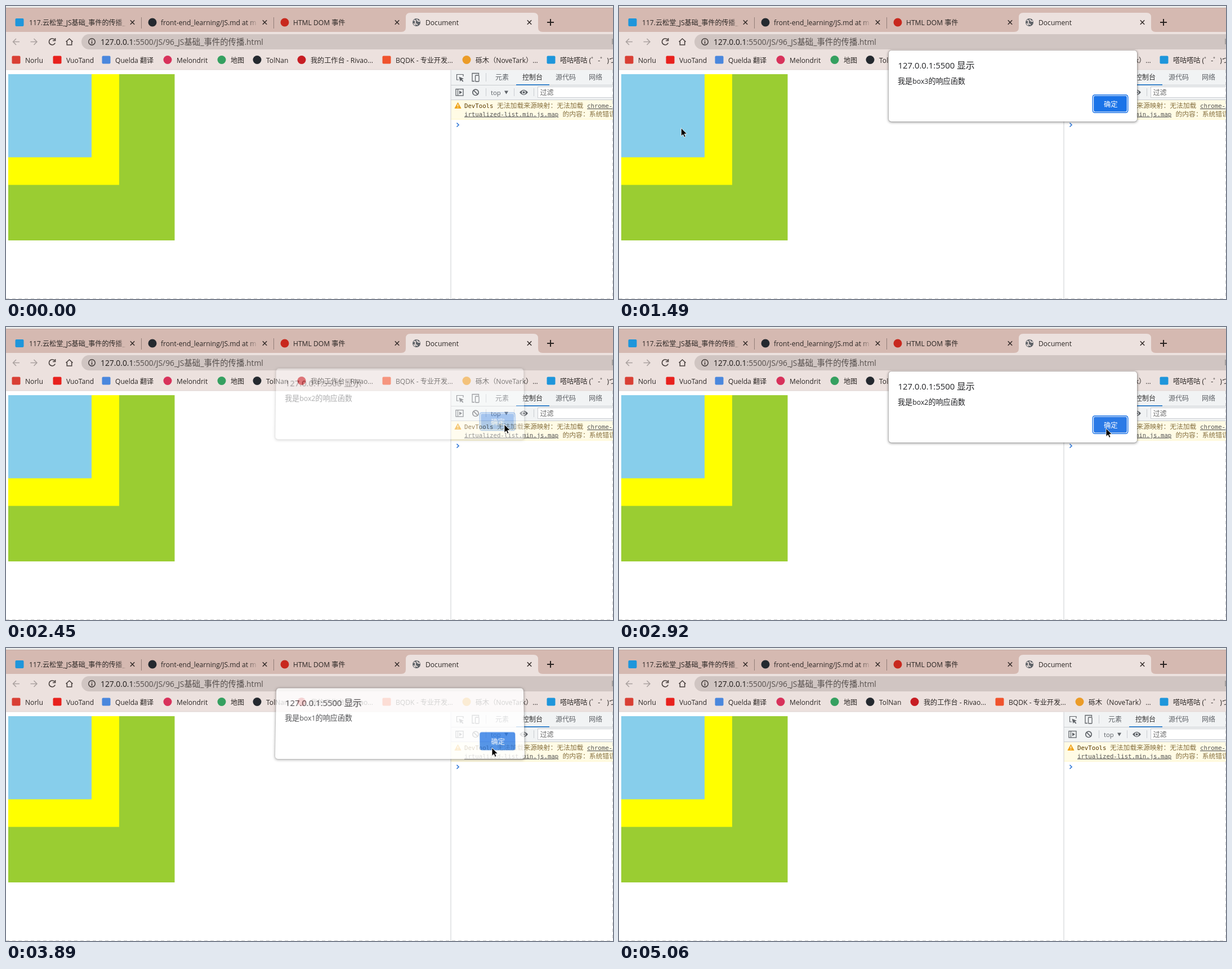
Write an HTML page that moves like this. It is 1078x520 px and loops after 5080 ms.

```html
<!DOCTYPE html>
<html lang="zh">
<head>
<meta charset="utf-8">
<style>
html, body { margin: 0; width: 100%; height: 100%; overflow: hidden; background: #fff; }
svg { position: absolute; left: 0; top: 0; overflow: visible; }
text { white-space: pre; font-family: 'Noto Sans CJK SC', 'Noto Sans CJK', sans-serif; }
#dialog {
  position: absolute; left: 479px; top: 79px; width: 441px; height: 126px;
  background: #fff; border-radius: 5px;
  box-shadow: 0 0 0 1px rgba(0,0,0,.1), 0 1px 4px 1px rgba(0,0,0,.35);
}
</style>
</head>
<body>
<svg id="page" width="1078" height="520"></svg>
<div id="dialog"><svg id="sheet" width="441" height="126"></svg></div>
<svg id="pointer" width="1078" height="520">
  <circle id="spot" r="12" fill="#ff0" fill-opacity=".5"/>
  <path id="arrow" d="M0 0V14.5L3.4 11.4 5.6 16.4 8 15.3 5.8 10.5H10.4Z" stroke="#fff" stroke-width=".9"/>
  <path id="beam" d="M-4.5-8H-1.5L0-7 1.5-8H4.5M0-7V7M-4.5 8H-1.5L0 7 1.5 8H4.5" fill="none" stroke="#333" stroke-width="1.4"/>
</svg>
<script>
const LOOP = 5080;
const $ = id => document.getElementById(id);
const UI = "'Open Sans', sans-serif", MONO = "'DejaVu Sans Mono', monospace";

// ratio: size of Latin runs against the Chinese ones
const text = (x, y, s, size = 12.1, fill = '#2b2624', ratio = 1, font = UI, more = '') =>
  `<text x="${x}" y="${y}" font-size="${size}" fill="${fill}" ${more}>` +
  s.replace(/[\x20-\x7e]+/g, run => `<tspan font-family="${font}" font-size="${size * ratio}">${run}</tspan>`) +
  '</text>';
const rect = (x, y, w, h, fill, r = 0, more = '') =>
  `<rect x="${x}" y="${y}" width="${w}" height="${h}" fill="${fill}" rx="${r}" ${more}/>`;
const disc = (x, y, r, fill) => `<circle cx="${x}" cy="${y}" r="${r}" fill="${fill}"/>`;
const ring = (x, y, r, stroke, width) => `<circle cx="${x}" cy="${y}" r="${r}" fill="none" stroke="${stroke}" stroke-width="${width}"/>`;
const shape = (d, fill) => `<path d="${d}" fill="${fill}"/>`;
const line = (d, stroke, width = 1, more = '') =>
  `<path d="${d}" fill="none" stroke="${stroke}" stroke-width="${width}" ${more}/>`;
const mark = (x, y, fill, round) => round ? disc(x, y, 7.5, fill) : rect(x - 7.5, y - 7, 15, 14, fill, 2);

function browser() {
  const tan = '#d5b9b1', bar = '#ece1de', ink = '#3c3533';
  let s = `<linearGradient id="fade"><stop stop-color="${tan}" stop-opacity="0"/><stop offset="1" stop-color="${tan}"/></linearGradient>`;
  s += rect(0, 0, 1078, 3, '#ebebea') + rect(0, 3, 1078, 43, tan) + rect(0, 3, 1078, 1, '#c4aaa3') + rect(0, 46, 1078, 67, bar);
  s += shape('M702 46Q710 46 710 38V20Q710 12 718 12H937Q945 12 945 20V38Q945 46 953 46Z', bar);

  // tabs
  s += mark(24, 29, '#1e96db') + mark(260, 29, '#24292f', 1) + mark(495, 29, '#c8281e', 1);
  s += text(41, 34, '117.云松堂_JS基础_事件的传播_') + text(275, 34, 'front-end_learning/JS.md at m');
  s += text(510, 34, 'HTML DOM 事件') + text(745, 34, 'Document');
  s += rect(196, 18, 18, 24, 'url(#fade)') + rect(428, 18, 20, 24, 'url(#fade)') + rect(448, 18, 6, 24, tan);
  s += disc(729, 29, 7, '#5f6368') + line('M724 26Q728 24 727 28T731 33M730 23Q729 27 735 27M724 31L727 34', bar, 1.8);
  for (const x of [224.5, 459.5, 694.5, 929.5])
    s += line(`M${x - 3.7} 25.3l7.4 7.4m0-7.4l-7.4 7.4`, '#332b29', 1.5);
  s += line('M240.5 20V40M475.5 20V40', '#927e78') + line('M961 29H973M967 23V35', '#2a2321', 2);

  // address bar
  s += line('M24 63.5H12.5M18 58L12.5 63.5 18 69M43.5 63.5H55M49.5 58L55 63.5 49.5 69', '#aaa19f', 1.5);
  s += line('M86.5 60A5.6 5.6 0 1 0 87.2 65.5M87.5 57V61.5H83', '#4a4240', 1.7);
  s += line('M106.5 63.5L112.5 58 118.5 63.5M108.3 62.5V69H116.7V62.5', '#4a4240', 1.6);
  s += rect(134, 50, 970, 27, '#d0c5c2', 13.5);
  s += ring(152.5, 63.5, 5.8, ink, 1.4) + line('M152.5 62.5V67M152.5 60V61.3', ink, 1.5);
  s += text(168, 69, '127.0.0.1', 14.4, '#1f1a19', .96);
  s += text(226.5, 69, ':5500/JS/96_JS基础_事件的传播.html', 14.4, '#57504e', .96);
  s += line('M1077 58V68', '#777');

  // bookmarks
  const links = [
    [18, 'Norlu', '#d93f34'], [91, 'VuoTand', '#e8211d'], [178, 'Quelda 翻译', '#4a87dd'],
    [287, 'Melondrit', '#d8325b', 1], [383, '地图', '#35a060', 1], [446, 'TolNan', '#24292f', 1],
    [525, '我的工作台 - Rivao...', '#c71d23', 1], [676, 'BQDK - 专业开发...', '#f0532d'],
    [818, '砾木（NoveTark）...', '#eb9c28', 1], [968, '嗒咕嗒咕 (゜-゜)つ', '#1e96db']];
  for (const [x, name, fill, round] of links) s += mark(x, 95.5, fill, round) + text(x + 16, 100.5, name);
  return s + rect(0, 112.5, 1078, 1, '#ddd4d1');
}

function content() {
  const box = (size, fill) => rect(4, 121, size, size - .5, fill);
  return box(295.5, '#9acd32') + box(197, '#ff0') + box(148, '#87ceeb');
}

function devtools() {
  const grey = '#5f6368', rule = '#cacdd1';
  const label = (x, y, s, fill = grey) => text(x, y, s, 12, fill, .94);
  let s = rect(790, 114, 288, 53, '#f1f3f4') + rect(790, 140, 288, 1, rule) + rect(790, 166, 288, 1, rule);

  // panel tabs
  s += line('M804 131H800.5V121.5H812V125', grey, 1.2) + shape('M804.5 125.5L813 129 809.5 130.3 812.5 133.3 811 134.5 808.2 131.5 806.5 134Z', grey);
  s += line('M828 125V119.5H839.5V122M828 125V133.5H832', grey, 1.3) + rect(833.5, 123, 6.5, 11, 'none', 1, `stroke="${grey}" stroke-width="1.3"`);
  s += line('M852.5 119V134M852.5 146V160M902.5 146V160M937.5 146V160', rule);
  s += label(869, 131, '元素') + label(917, 131, '控制台', '#333') + label(976, 131, '源代码') + label(1035, 131, '网络');
  s += rect(906, 139, 59, 1.6, '#1a73c8');

  // console bar
  s += rect(799, 147.5, 13, 11.5, 'none', 0, `stroke="${grey}" stroke-width="1.3"`) + line('M802.5 148V159', grey, 1.2) + shape('M805 150V156.5L810 153.2Z', grey);
  s += ring(834, 153.3, 5.2, grey, 1.7) + line('M830.4 149.7L837.6 156.9', grey, 1.7);
  s += label(861, 157.5, 'top') + shape('M885 150.5H892L888.5 156.5Z', grey);
  s += shape('M912 153.3Q919.5 144 927 153.3Q919.5 162.6 912 153.3Z', grey) + disc(919.5, 153.3, 3.4, '#f1f3f4') + disc(919.5, 153.3, 2, grey);
  s += rect(944.5, 143.5, 140, 19, '#fff', 0, `stroke="${rule}"`) + label(948.5, 158, '过滤', '#666');

  // warning
  s += rect(790, 167, 288, 34, '#fffbe5') + rect(790, 200.5, 288, 1, '#fff5c2');
  s += '<path d="M802.5 171.5L808 181.5H797Z" fill="#f0a51c" stroke="#f0a51c" stroke-linejoin="round"/>' + line('M802.5 174.5V178M802.5 179.3V180.6', '#fff', 1.3);
  const log = (x, y, str, fill, more = 'font-weight="300"') => text(x, y, str, 11.8, fill, .907, MONO, more);
  const link = (x, y, str) => log(x, y, str, '#545454', 'text-decoration="underline"');
  s += log(814, 181, 'DevTools', '#5c3c00') + log(872, 181, '无法加载来源映射：无法加载', '#86703f') + link(1032, 181, 'chrome-');
  s += link(814, 195.5, 'irtualized-list.min.js.map') + log(988.5, 195.5, '的内容：系统错误', '#86703f');
  s += line('M800.5 207.5L804 211 800.5 214.5', '#367cd9', 1.7);
  return s + rect(789.5, 113.5, 1, 407, '#cbced2');
}

$('page').innerHTML = browser() + content() + devtools() +
  line('M0 519.5H1078M1077.5 113V520', '#c9c9c9', 1, 'stroke-dasharray="6 5"');
$('sheet').innerHTML =
  text(16.5, 32, '127.0.0.1:5500 显示', 15.8, '#202124', .94) +
  text(16, 58.5, '我是box3的响应函数', 13.1, '#202124', .94, UI, 'id="message"') +
  rect(362, 78.5, 63, 32, '#1a73e8', 4, 'id="button"') +
  rect(363.5, 80, 60, 29, 'none', 3, 'id="ring" stroke="#fff" stroke-width="1.2"') +
  text(382, 100, '确定', 12.3, '#fff');
const boxName = $('message').querySelector('tspan');

// pointer stops: time, x, y
const stops = [[500, 437, 515], [800, 118, 258], [930, 103, 217], [1450, 103, 217], [2170, 885, 173],
  [2450, 885, 173], [2800, 865, 180], [3010, 865, 180], [3240, 828, 243], [3250, 828, 243],
  [3600, 863, 177], [3910, 863, 177], [4510, 701, 520]];
const clicks = [[1220, 1300], [2250, 2310], [2930, 2990], [3790, 3850]];
const alerts = [['box3', 1310, 2310], ['box2', 2420, 2960], ['box1', 3050, 3840]]; // label, open, close
const IN = 160, OUT = 140;

function pointerAt(t) {
  const i = stops.findIndex(p => p[0] > t);
  if (i < 1) return null;
  const [t0, x0, y0] = stops[i - 1], [t1, x1, y1] = stops[i];
  const p = (t - t0) / (t1 - t0), e = p * p * (3 - 2 * p);
  return [x0 + (x1 - x0) * e, y0 + (y1 - y0) * e];
}

function drawDialog(t, pos) {
  const now = alerts.find(a => t >= a[1] && t < a[2] + OUT);
  $('dialog').style.visibility = now ? 'visible' : 'hidden';
  if (!now) return;
  const [label, open, close] = now, closing = t >= close;
  const p = closing ? (t - close) / OUT : Math.min(1, (t - open) / IN);
  const rest = (1 - p) ** 3, lift = closing ? 1 - rest : rest;
  boxName.textContent = label;
  $('dialog').style.opacity = closing ? 1 - p ** 1.6 : Math.min(1, p * 2);
  $('dialog').style.transform = lift ? `translateY(${-11 * lift}px) perspective(1000px) rotateX(${6 * lift}deg)` : 'none';
  const hover = pos && pos[0] > 841 && pos[0] < 905 && pos[1] > 157 && pos[1] < 190;
  $('ring').style.display = closing ? 'none' : '';
  $('button').setAttribute('fill', hover ? '#2b7ae6' : '#1a73e8');
  $('button').setAttribute('stroke', closing ? 'none' : '#1a73e8');
}

function drawPointer(t, pos) {
  const shown = pos && t >= 540;
  $('pointer').style.display = shown ? '' : 'none';
  if (!shown) return;
  const [x, y] = pos, typing = x > 790 && y > 206;
  $('arrow').style.display = typing ? 'none' : '';
  $('beam').style.display = typing ? '' : 'none';
  $(typing ? 'beam' : 'arrow').setAttribute('transform', `translate(${x} ${y})`);
  $('spot').style.display = clicks.some(c => t >= c[0] && t < c[1]) ? '' : 'none';
  $('spot').setAttribute('transform', `translate(${x - 1} ${y - 2})`);
}

function frame(now) {
  const t = now % LOOP, pos = pointerAt(t);
  drawDialog(t, pos);
  drawPointer(t, pos);
  requestAnimationFrame(frame);
}
frame(0);
</script>
</body>
</html>
```
